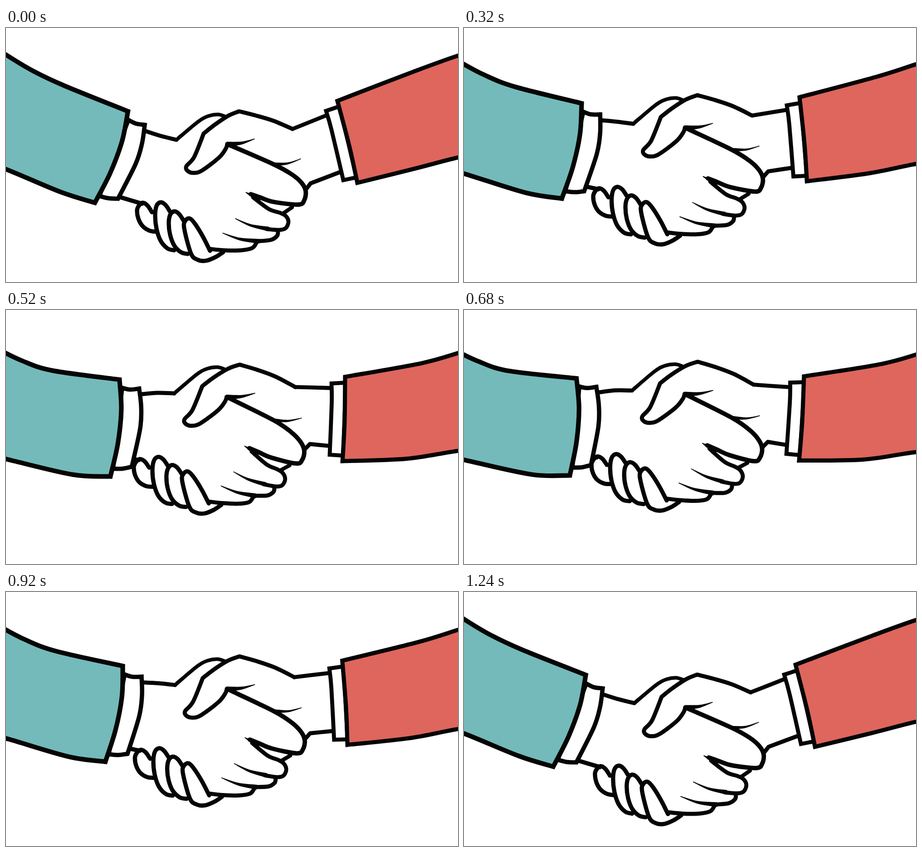
These frames come from a looping animation (997 px wide and 561 px high, 1.28 s). An HTML page:

```html
<!DOCTYPE html>
<html lang="en">
<head>
<meta charset="utf-8">
<title>Handshake</title>
<style>
  html, body { margin: 0; width: 100%; height: 100%; overflow: hidden; background: #fff; }
  svg { display: block; width: 100vw; height: 100vh; }
</style>
</head>
<body>
<svg id="stage" viewBox="0 0 997 561" preserveAspectRatio="none"></svg>
<script>
const LOOP = 1280, STEP = 40;
const INK = '#050505', TEAL = '#74baba', RED = '#de665d';
const stage = document.getElementById('stage');
const clamp = v => Math.min(1, Math.max(0, v));

// An arm turns about its elbow; the turn fades towards the shoulder.
const arm = (cx, cy, degrees, side) => ([x, y], k) => {
  const out = Math.max(0, (x - cx) * side);
  const a = degrees * Math.PI / 180 * k / (1 + out / 200);
  const u = x - cx, v = y - cy, c = Math.cos(a), s = Math.sin(a);
  return [cx + u * c - v * s, cy + u * s + v * c];
};
const leftArm = arm(141, 242, -16, -1);
const rightArm = arm(789, 217, 17, 1);

// The clasp is lifted, sagging a little to both sides.
function hand([x, y], k) {
  const d = x - 450;
  const dx = -3 + 0.03 * d + 0.0004 * Math.max(0, d) * (280 - y);
  const dy = -71.5 + 0.0004 * d * d;
  return [x + dx * k, y + dy * k];
}

// A wrist goes over from hand to arm.
const wrist = (turn, from, to) => (p, k) => {
  const w = clamp((p[0] - from) / (to - from));
  const a = hand(p, k), b = turn(p, k);
  return a.map((v, i) => v + (b[i] - v) * w);
};
const leftWrist = wrist(leftArm, 376, 306);
const rightWrist = wrist(rightArm, 672, 704);

// Points run smoothly through each run; "|" marks a corner.
const parse = s => s.split('|').map(run =>
  run.trim().split(/\s+/).map(p => p.split(',').map(Number)));

const parts = [];

function add(runs, move, style) {
  const el = document.createElementNS('http://www.w3.org/2000/svg', 'path');
  const look = { fill: 'none', stroke: INK, 'stroke-linecap': 'round',
    'stroke-linejoin': 'round', ...style };
  for (const k in look) el.setAttribute(k, look[k]);
  stage.append(el);
  parts.push({ el, runs, move, closed: look.fill !== 'none' });
}

const line = (pts, width = 9.5, move = hand) => add(parse(pts), move, { 'stroke-width': width });

const cloth = (pts, move, fill, width) =>
  add(parse(pts), move, { fill, 'stroke-width': width, 'stroke-linejoin': 'miter' });

// A brush mark that swells from a point to the given width
function taper(pts, width) {
  const [run] = parse(pts);
  const edge = side => run.map(([x, y], i) => [x, y + side * width / 2 * i / (run.length - 1)]);
  const back = edge(1).reverse();
  add([edge(-1), back.slice(0, 1), back.slice(1)], hand, { fill: INK, 'stroke-width': 1.5 });
}

// A curled finger, hanging down by h from its top knuckle
function finger(x, y, h) {
  const shape = [[21, 21], [11, 6], [0, 0], [-9, 8], [-12, 0.28 * h], [-9, 0.55 * h],
    [0, 0.8 * h], [15, 0.96 * h], [30, h]];
  add([shape.map(([dx, dy]) => [x + dx, y + dy])], hand, { 'stroke-width': 9.3 });
}

// Wrists
line('306,227 340,238 376,247', 9, leftWrist);
line('253,374 300,388');
line('632,223 704,194', 8.8, rightWrist);
line('740,317 672,343|662,356', 9, rightWrist);

// Far thumb, near thumb and creases
line('376,247 425,206 448,194 468,191 482,195', 8);
taper('448,194 412,217 378,245', 9);
line('632,223 590,205 550,193 514,184|490,194 460,214 436,233|' +
     '415,285 398,305 400,315 413,320 432,315 470,286 485,266 488,256', 9);
taper('548,245 520,254 488,257', 10);
taper('650,289 622,299 592,301', 6);

// Fingers on the right
line('494,259 590,301 630,323 652,342 661,360 658,380 645,390 590,384 560,374 540,367', 9.8);
line('545,374 580,400 604,408 617,415 623,428 617,442 603,446 575,444', 8.8);
taper('529,363 542,370 560,378', 12);
line('631,396 612,409', 8.5);
taper('506,421 540,436 580,444', 8.5);
line('600,449 598,459 584,468 553,471', 9);
taper('478,453 515,466 558,471', 9);
line('552,475 543,486 518,491 482,491 450,488', 9);

// Fingers on the left
for (const [x, y, h] of [[301, 386, 64], [341, 385, 106], [371, 405, 94]]) finger(x, y, h);
line('450,492 435,462 418,434 406,421 396,425 393,442 408,498 423,512 441,514 462,506 479,495', 9.3);

// Cuffs, then sleeves over them
cloth('270,203 286,211 306,214|300,255 286,300 247,377|226,376 206,371', leftArm, '#fff', 9.5);
cloth('736,173 706,183|718,225 744,336|773,330', rightArm, '#fff', 8.8);
cloth('-80,5 0,59 60,95 130,128 269,184|256,250 230,320 196,386|120,362 0,312 -80,285',
  leftArm, TEAL, 10.2);
cloth('1080,37 997,61 900,96 731,161|757,260 775,342|900,311 997,286 1080,270',
  rightArm, RED, 9.2);

function trace(runs, closed) {
  let d = '', last;
  const fmt = n => n.toFixed(2);
  runs.forEach((run, i) => {
    const p = i ? [last, ...run] : run;
    if (!i) d = 'M' + p[0].map(fmt);
    for (let k = 0; k < p.length - 1; k++) {
      const a = p[k], b = p[k + 1], before = p[k - 1] || a, after = p[k + 2] || b;
      const c1 = a.map((v, j) => v + (b[j] - before[j]) / 6);
      const c2 = b.map((v, j) => v - (after[j] - a[j]) / 6);
      d += 'C' + [...c1, ...c2, ...b].map(fmt);
    }
    last = p[p.length - 1];
  });
  return closed ? d + 'Z' : d;
}

// Up for half the loop, down for the other half
function lift(t) {
  const x = 1 - Math.abs(1 - 2 * t / LOOP);
  return 1.02 * (0.8 * x * x * (3 - 2 * x) + 0.2 * x);
}

function draw(t) {
  const k = lift(t);
  for (const { el, runs, move, closed } of parts)
    el.setAttribute('d', trace(runs.map(run => run.map(p => move(p, k))), closed));
}

let start;
function tick(now) {
  start ??= now;
  draw(Math.floor(((now - start) % LOOP) / STEP) * STEP);
  requestAnimationFrame(tick);
}
draw(0);
requestAnimationFrame(tick);
</script>
</body>
</html>
```
